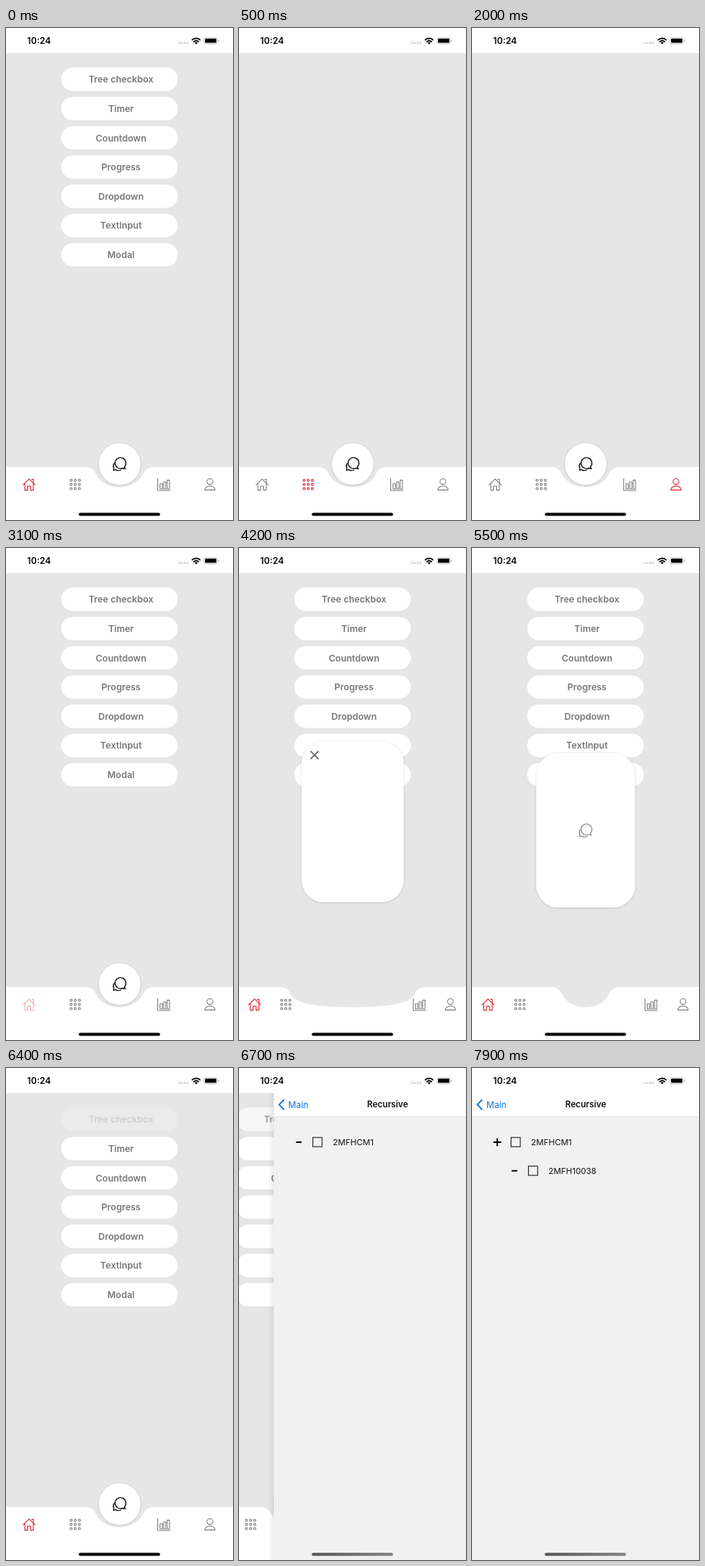
An HTML page for the animation above (8 s loop, 300 by 650 pixels).

```html
<!DOCTYPE html>
<html lang="en">
<head>
<meta charset="utf-8">
<title>Tab bar demo</title>
<style>
html, body { margin: 0; width: 100%; height: 100%; overflow: hidden; background: #fff; }
svg { display: block; width: 100%; height: 100%; font-family: Inter, Roboto, sans-serif; }
.line { fill: none; stroke-linecap: round; stroke-linejoin: round; }
</style>
</head>
<body>
<svg id="stage" viewBox="0 0 300 650"></svg>
<script>
const LOOP = 8000, TICK = 100;
const RED = '#e0242f', GREY = '#808080', BLUE = '#1474dc';
const LABELS = ['Tree checkbox', 'Timer', 'Countdown', 'Progress', 'Dropdown', 'TextInput', 'Modal'];

// Taps on the tab bar; a tab turns active when the finger lifts.
const TAPS = [
  { tab: 0, down: -900, up: -500 },
  { tab: 1, down: 500, up: 500 },
  { tab: 2, down: 1100, up: 1250 },
  { tab: 3, down: 1500, up: 1750 },
  { tab: 0, down: 2800, up: 3050 }
];

const ramp = (t, start, length) => Math.min(1, Math.max(0, (t - start) / length));
const ease = x => x * x * (3 - 2 * x);
// Opacity of something touched: a quick dip, then a slower return.
const touch = (t, down, up) => t < up ? 1 - .8 * ramp(t, down, 100) : up > down ? .2 + .8 * ramp(t, up, 250) : 1;

const group = (x, y, body, attrs = '') => `<g transform="translate(${x} ${y})" ${attrs}>${body}</g>`;
const rect = (x, y, w, h, r, attrs) => `<rect x="${x}" y="${y}" width="${w}" height="${h}" rx="${r}" ${attrs}/>`;
const line = (d, color, width) => `<path class="line" d="${d}" stroke="${color}" stroke-width="${width}"/>`;
const text = (x, y, s, size, attrs = '') => `<text x="${x}" y="${y}" font-size="${size}" ${attrs}>${s}</text>`;
const repeat = (n, draw) => Array.from({ length: n }, (_, i) => draw(i)).join('');

const cell = i => `M${i % 3 * 5.5 - 6.1} ${Math.floor(i / 3) * 5.5 - 6.8}` +
  'h1.2l.7.7v1.2l-.7.7h-1.2l-.7-.7v-1.2z';
const bar = i => `M${i * 4.8 - 5} 6v${-7 - i * 2.3}h3V6z`;
const ICONS = [
  'M-8 .6L0-7.2L8 .6M3.6-6.6H5.8V-1.8M-5.6-1V7.6H-2V2.2H2V7.6H5.6V-1',
  repeat(9, cell),
  'M-8-7.6V8H8.3' + repeat(3, bar),
  'M-3.8-3.7a3.8 3.8 0 1 0 7.6 0a3.8 3.8 0 1 0-7.6 0M-6.8 7.4C-6.8 3.8-3.6 2.2 0 2.2S6.8 3.8 6.8 7.4Z'
];
const CHAT = 'M6.3 4L7.8 6.4L4 5.5A7.2 7.2 0 1 1 6.3 4Z' +
  'M-7.2-.6C-8.6 1.4-8.2 4-7.4 5.2L-8 8.2L-5 7.6C-3 8.8 0 8.8 1.8 8';

function statusBar() {
  return rect(0, 0, 300, 33, 0, 'fill="#fff"') + text(28, 21, '10:24', 11.7, 'font-weight="600"') +
    repeat(4, i => `<circle cx="${228.7 + i * 3.7}" cy="19.7" r="1.2" fill="#c4c4c4"/>`) +
    line('M246.2 15.6a7.6 7.6 0 0 1 10.2 0M248.3 18a4.6 4.6 0 0 1 6 0', '#000', 1.7) +
    '<path d="M249.3 19.5a3 3 0 0 1 4 0L251.3 21.5z"/>' +
    rect(261.8, 12.8, 17.4, 8, 2.3, 'fill="none" stroke="#aaa" stroke-width=".8"') +
    rect(263, 14, 15, 5.6, 1.3, '') + rect(280.2, 15.4, 1, 2.8, .5, 'fill="#aaa"');
}

function menu(t) {
  return LABELS.map((label, i) => group(73, 52.3 + i * 38.62,
    rect(0, 0, 154, 31, 15.5, 'fill="#fff"') +
    text(79, 20, label, 12, 'font-weight="600" fill="#777" text-anchor="middle"'),
    `opacity="${i ? 1 : touch(t, 6300, 6540)}"`)).join('');
}

function tabBar(t, active, open, e) {
  const tap = TAPS.filter(p => p.down <= t).pop();
  const half = 122 - 68 * open;
  const xs = [half / 4, half * 3 / 4, 300 - half * 3 / 4, 300 - half / 4];
  const f = e * .8;
  const shape = `M0 580H${104 - e}Q${115 - e} 580 ${119 - e} 589C${124 - e} 601 ${137 - f} 606.5 150 606.5` +
    `C${163 + f} 606.5 ${176 + e} 601 ${181 + e} 589Q${185 + e} 580 ${196 + e} 580H300V650H0Z`;
  return `<path d="${shape}" fill="#fff"/>` + ICONS.map((d, i) => group(xs[i], 603,
    line(d, i === active ? RED : GREY, 1.1),
    `opacity="${i === tap.tab ? touch(t, tap.down, tap.up) : 1}"`)).join('');
}

// The round button grows into the modal card.
function card(t, open, closing) {
  const w = 55 + 137 * open, h = 55 + 270 * open, cy = 576 - 367.5 * open;
  const x = 150.2 - w / 2, y = cy - h / 2;
  const content = open > 0 && !closing
    ? group(x + 17, y + 18, line('M-4.8-4.8L4.8 4.8M4.8-4.8L-4.8 4.8', '#555', 1.7),
      `opacity="${Math.min(1, open * 1.6) * touch(t, 5200, 5500)}"`)
    : group(150, cy, line(CHAT, '#111', 1.35), `opacity="${1 - open}"`);
  return rect(x, y, w, h, 27.5 + 3 * open, 'fill="#fff" filter="url(#soft)"') + content;
}

function homePage(t) {
  const active = TAPS.filter(p => p.up <= t).pop().tab;
  const closing = t > 5400;
  const open = ease(ramp(t, 3950, 450)) - ease(ramp(t, 5400, 215));
  const spread = closing ? 0 : 68 * Math.min(1, open * 1.28);
  return rect(0, 33, 300, 617, 0, 'fill="#e6e6e6"') + (active === 0 ? menu(t) : '') +
    tabBar(t, active, open, spread) + card(t, open, closing);
}

function treeRow(x, y, label, sign, alpha) {
  return group(x, y, `<path d="${sign}" stroke="#000" stroke-width="1.9" opacity="${alpha}"/>` +
    rect(18.2, -6.2, 12.2, 12.2, 0, 'fill="none" stroke="#222" stroke-width="1.1"') +
    text(44.7, 4.3, label, 11, 'fill="#111"'));
}

function treePage(t) {
  const plus = 'M-5.2 0H5.2M0-5.2V5.2', minus = 'M-4 0H3.4';
  const expanded = t > 7650;
  return rect(0, 33, 300, 617, 0, 'fill="#f1f1f1"') + rect(0, 33, 300, 31, 0, 'fill="#fff"') +
    rect(0, 64, 300, .6, 0, 'fill="#dcdcdc"') +
    line('M13 42.4L7 48.4L13 54.6', BLUE, 2) + text(19, 52.5, 'Main', 11.6, `fill="${BLUE}"`) +
    text(150.3, 52.4, 'Recursive', 11.3, 'font-weight="600" fill="#111" text-anchor="middle"') +
    treeRow(33.4, 98, '2MFHCM1', expanded ? plus : minus, touch(t, 7500, 7650)) +
    (expanded ? treeRow(56.4, 135.8, '2MFH10038', minus, 1) : '');
}

const DEFS = `<defs>
  <filter id="soft" x="-20%" y="-20%" width="140%" height="140%">
    <feDropShadow dx="0" dy=".4" stdDeviation="1" flood-opacity=".25"/></filter>
  <linearGradient id="edge"><stop stop-opacity="0"/><stop offset="1" stop-opacity=".07"/></linearGradient>
  <linearGradient id="grip"><stop stop-color="#555"/><stop offset="1" stop-color="#828282"/></linearGradient>
</defs>`;

function render(t) {
  const slide = 1 - Math.exp(-.0125 * Math.max(0, t - 6550));
  let out = DEFS + group(-90 * slide, 0, homePage(t));
  if (slide > 0) {
    out += group(300 * (1 - slide), 0, rect(-8, 33, 8, 617, 0, 'fill="url(#edge)"') + treePage(t));
  }
  return out + statusBar() + rect(96.2, 640.5, 107.4, 3.9, 1.9, `fill="${slide > 0 ? 'url(#grip)' : '#000'}"`);
}

const stage = document.getElementById('stage');
let shown = -1;
function frame() {
  const t = Math.floor(performance.now() % LOOP / TICK) * TICK;
  if (t !== shown) stage.innerHTML = render(shown = t);
  requestAnimationFrame(frame);
}
frame();
</script>
</body>
</html>
```
